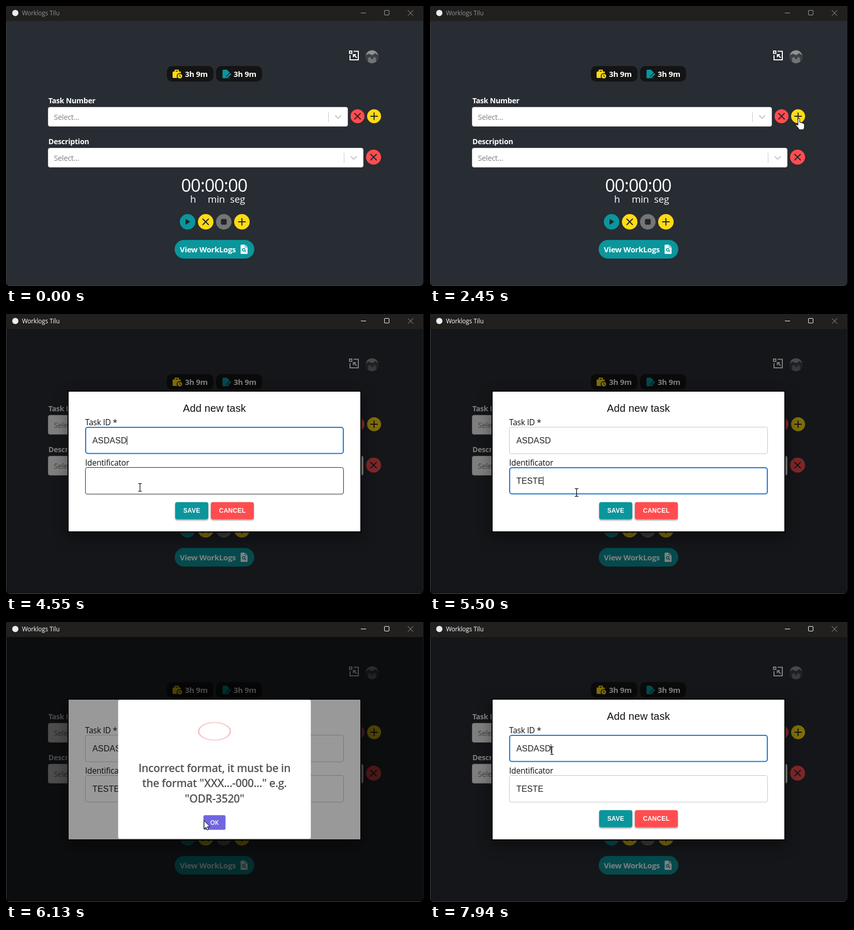
Recreate the animation shown at these times as an HTML page. Size 808 by 541 pixels, loop 8000 ms.

```html
<!DOCTYPE html>
<html lang="en">
<head>
<meta charset="utf-8">
<title>Worklogs</title>
<style>
  html, body { margin: 0; width: 100%; height: 100%; overflow: hidden; background: #000; }
  svg { display: block; width: 808px; height: 541px; }
  text { font-family: "Open Sans", "Noto Sans", sans-serif; white-space: pre; }
  .bold { font-weight: 700; fill: #fff; letter-spacing: -.02em; }
  .label { font-size: 14.2px; }
  .pill { font-size: 14.9px; }
  .hint { font-size: 14.5px; fill: #808080; letter-spacing: -.02em; }
  .unit { font-size: 18.8px; fill: #fff; letter-spacing: -.01em; }
  .field { font-size: 15.5px; fill: #111; letter-spacing: -.013em; }
  .arial { font-family: "Liberation Sans", Arial, sans-serif; }
  .input { font-size: 16px; fill: #212121; letter-spacing: .00938em; }
  .button { font-size: 12px; font-weight: 700; fill: #fff; letter-spacing: .02em; }
  .alert { font-size: 21.8px; font-weight: 600; fill: #545454; letter-spacing: -.019em; }
  .mid { text-anchor: middle; }
  .dark { stroke: #22252b; stroke-width: 2; fill: none; stroke-linecap: round; }
  .line { fill: none; stroke: #fff; stroke-width: 2; }
  .raised { filter: drop-shadow(0 2px 1.5px rgba(0,0,0,.4)); }
  .raised.over { filter: drop-shadow(0 4px 4px rgba(0,0,0,.5)); }
  #modal > .paper { filter: drop-shadow(0 10px 14px rgba(0,0,0,.4)); }
</style>
</head>
<body>
<svg viewBox="0 0 808 541">
  <defs>
    <path id="cross" class="dark" d="M-5.5-5.5 5.5 5.5M5.5-5.5-5.5 5.5"/>
    <path id="plus" class="dark" d="M-6.5 0H6.5M0-6.5V6.5"/>
    <path id="chevron" d="M-5-2.5 0 2.5 5-2.5" fill="none" stroke="#ccc" stroke-width="2.4" stroke-linecap="round"/>
    <clipPath id="face"><circle cx="707.5" cy="98" r="12.5"/></clipPath>
  </defs>

  <rect width="808" height="541"/>
  <rect x=".5" y="-10" width="805.5" height="550.5" rx="7" fill="#282c33" stroke="#3b3e43"/>
  <rect width="806" height="29" fill="#21201f"/>

  <circle cx="18" cy="13.5" r="6" fill="#e9eef2"/>
  <text id="caption" x="31" y="18" font-size="11.8" letter-spacing="-.1">Worklogs Tilu</text>
  <g id="controls" fill="none">
    <path d="M686 13.5H696"/>
    <rect x="731.5" y="8.5" width="9" height="9" rx="1.5"/>
  </g>
  <path d="M777 8.5 787 18.5M787 8.5 777 18.5" stroke="#a5a5a5"/>

  <!-- header -->
  <g class="line">
    <rect x="664" y="87" width="4.5" height="4.5"/>
    <path d="M672 87.5H681V104H665V95M678 100 671.5 93.5M671.5 99V94H676.5"/>
  </g>
  <g clip-path="url(#face)">
    <rect x="694" y="85" width="27" height="27" fill="#8f9296"/>
    <path d="M694 96 701 92 708 95 714 91 721 96V112H694Z" fill="#3f4042"/>
    <path d="M700 112V103Q700 98 704 99L708 104 712 98Q716 99 716 112Z" fill="#727376"/>
  </g>
  <rect x="311" y="116" width="90" height="30" rx="10" fill="#141414"/>
  <rect x="406" y="116" width="89" height="30" rx="10" fill="#141414"/>
  <g fill="#ffdb15">
    <rect x="322" y="126.500" width="16" height="12.500" rx="1.500"/>
    <path d="M327 127V124H333V127" fill="none" stroke="#ffdb15" stroke-width="2"/>
    <circle cx="336" cy="135.500" r="5.300" stroke="#141414" stroke-width="1.500"/>
    <path d="M336 132.500V136L338 137" fill="none" stroke="#141414" stroke-width="1.200"/>
  </g>
  <path d="M420 123H427L432 128V138Q432 139.500 430.500 139.500H420Q418.500 139.500 418.500 138V124.500Q418.500 123 420 123Z" fill="#0a969c"/>
  <path d="M435 130 427 138" stroke="#141414" stroke-width="5.500"/>
  <path d="M434.500 130.500 427 138" stroke="#0a969c" stroke-width="3"/>
  <text class="bold pill" x="346" y="137">3h 9m</text>
  <text class="bold pill" x="440" y="137">3h 9m</text>

  <!-- selects -->
  <text class="bold label" x="82" y="188">Task Number</text>
  <text class="bold label" x="82" y="267">Description</text>
  <g fill="#fff" stroke="#ccc">
    <rect x="81.500" y="195.500" width="579" height="37" rx="3.500"/>
    <rect x="81.500" y="274.500" width="609" height="37" rx="3.500"/>
    <path d="M623.500 204V224M653.500 283V303"/>
  </g>
  <text class="hint" x="92.500" y="220">Select...</text>
  <text class="hint" x="92.500" y="299">Select...</text>
  <use href="#chevron" x="642" y="214.500"/>
  <use href="#chevron" x="672" y="293.500"/>
  <circle cx="679.500" cy="213" r="13.500" fill="#ff4d4f"/>
  <circle cx="711.500" cy="213" r="13.500" fill="#ffdb15"/>
  <circle cx="710.500" cy="292" r="14.500" fill="#ff4d4f"/>
  <use href="#cross" x="679.500" y="213"/>
  <use href="#plus" x="711.500" y="213"/>
  <use href="#cross" x="710.500" y="292"/>

  <!-- timer -->
  <text class="mid" x="402.500" y="359" font-size="34" fill="#fff" letter-spacing="-.85">00:00:00</text>
  <text class="unit" x="356" y="380">h</text>
  <text class="unit" x="390" y="380">min</text>
  <text class="unit" x="433" y="380">seg</text>
  <circle cx="351" cy="417" r="15" fill="#0a969c"/>
  <circle cx="386" cy="417" r="15" fill="#ffdb15"/>
  <circle cx="421" cy="417" r="15" fill="#757575"/>
  <circle cx="456" cy="417" r="15" fill="#ffdb15"/>
  <path d="M347.500 412 355.500 417 347.500 422Z" fill="#22252b" stroke="#22252b" stroke-linejoin="round"/>
  <use href="#cross" x="386" y="417"/>
  <rect x="415.500" y="411.500" width="11" height="11" rx="2" fill="#22252b"/>
  <use href="#plus" x="456" y="417"/>

  <rect x="326" y="452" width="154" height="36" rx="18" fill="#0a969c"/>
  <text class="bold pill" x="336" y="476">View WorkLogs</text>
  <path d="M455 461H462L467 466V477.500Q467 479 465.500 479H455Q453.500 479 453.500 477.500V462.500Q453.500 461 455 461Z" fill="#fff"/>
  <path d="M462 461V466H467" fill="none" stroke="#0a969c"/>
  <g fill="none" stroke="#0a969c" stroke-width="1.500"><circle cx="459.500" cy="471" r="2.500"/><path d="M461.500 473 464 475.500"/></g>

  <!-- form -->
  <g id="modal">
    <rect x="1" y="29" width="805" height="511" fill-opacity=".5"/>
    <rect class="paper" x="120" y="149" width="566" height="272" fill="#fff" stroke="#000" stroke-width="2"/>
    <text class="arial mid" x="403" y="189" font-size="20" letter-spacing=".15" fill="#111">Add new task</text>
    <text class="field" x="153" y="215">Task ID *</text>
    <text class="field" x="153" y="293">Identificator</text>
    <rect id="box0" fill="none" rx="4"/>
    <rect id="box1" fill="none" rx="4"/>
    <text id="text0" class="arial input" x="167" y="250"></text>
    <text id="text1" class="arial input" x="167" y="328"></text>
    <rect id="caret" width="1" height="17" fill="#000"/>
    <rect id="save" class="raised" x="327" y="363.500" width="64" height="33" rx="4" fill="#0a969c"/>
    <rect class="raised" x="396" y="363.500" width="83" height="33" rx="4" fill="#ff4d4f"/>
    <text class="arial button mid" x="359" y="384">SAVE</text>
    <text class="arial button mid" x="437.500" y="384">CANCEL</text>
  </g>

  <!-- alert -->
  <rect id="shade" x="1" y="29" width="805" height="511"/>
  <g id="alert">
    <rect x="211" y="146" width="384" height="277" rx="4" fill="#fff"/>
    <g fill="none" stroke="#f27474">
      <circle id="ring" r="31.500" stroke-width="3"/>
      <path id="mark" d="M-11.500-11.500 11.500 11.500M11.500-11.500-11.500 11.500" stroke-width="4"/>
    </g>
    <text class="alert mid" x="403" y="290.500">Incorrect format, it must be in</text>
    <text class="alert mid" x="403" y="320.500">the format "XXX...-000..." e.g.</text>
    <text class="alert mid" x="403" y="350.500">"ODR-3520"</text>
    <rect id="ok" x="381" y="376" width="44" height="29" rx="3"/>
    <text class="mid" x="403" y="395" font-size="12" font-weight="600" fill="#fff">OK</text>
  </g>

  <g id="cursor">
    <path id="arrow" d="M0 0V16L3.700 12.600 6.200 18.400 8.700 17.300 6.200 11.700H11.300Z" fill="#fff" stroke="#000"/>
    <path id="hand" d="M-1.700 12V1.700a1.700 1.700 0 0 1 3.400 0V8q3-1 3.400 1 2.700-.8 3.200 1 2.500-.3 2.500 2v4q0 3-2 6h-8q-2-4-6.500-8.500 1-2.500 4-.5z" fill="#fff" stroke="#000"/>
    <path id="beam" d="M-3.500-7.500H-1Q0-7.500 0-6.500 0-7.500 1-7.500H3.500M0-6.500V6.500M-3.500 7.500H-1Q0 7.500 0 6.500 0 7.500 1 7.500H3.500" fill="none" stroke="#000" stroke-width="1.200"/>
  </g>
</svg>
<script>
const LOOP = 8000, ACTIVE = 2710, OPEN = 2770, ALERT = 5911, CLOSE = 7190;
const $ = id => document.getElementById(id);
const set = (id, attrs) => { for (const k in attrs) $(id).setAttribute(k, attrs[k]); };
const show = (id, on) => set(id, { visibility: on ? 'visible' : 'hidden' });
const clamp = v => Math.max(0, Math.min(1, v));
const inside = (x, y, l, t, r, b) => x >= l && x <= r && y >= t && y <= b;

// Linear interpolation through rows of [time, value, ...].
function track(rows, t) {
  const i = rows.findIndex(r => r[0] > t);
  if (i < 0) return rows[rows.length - 1].slice(1);
  if (!i) return rows[0].slice(1);
  const a = rows[i - 1], b = rows[i], k = (t - a[0]) / (b[0] - a[0]);
  return a.slice(1).map((v, j) => v + (b[j + 1] - v) * k);
}

const path = [
  [140, 740, 494], [500, 762, 400], [880, 774, 294], [1200, 768, 166],
  [1420, 765, 180], [1750, 750, 200], [2100, 724, 234], [2450, 713, 217],
  [3120, 713, 217], [3800, 320, 250], [4330, 320, 250], [4550, 259, 335],
  [5430, 259, 335], [5780, 381, 384], [6060, 381, 384], [6840, 403, 381],
  [7200, 403, 381], [7690, 226, 245], [7930, 226, 245], [7940, 235.5, 248.5]
];
const pop = [[0, .7], [135, 1.05], [240, .95], [300, 1]];
const markPop = [[250, 20, .4, 0], [400, -4.5, 1.15, .6], [500, 0, 1, 1]];
const fields = [
  { y: 218, word: 'ASDASD', keys: [4060, 4120, 4180, 4240, 4300, 4360], focus: [[4000, 4750], [7800, LOOP]] },
  { y: 296, word: 'TESTE', keys: [4950, 5020, 5220, 5290, 5360], focus: [[4750, 5850]] }
];

function drawField(f, i, t, x, y, free) {
  const typed = f.keys.filter(k => k <= t);
  const span = f.focus.find(s => t >= s[0] && t < s[1]);
  const over = free && inside(x, y, 153, f.y, 653, f.y + 52);
  const inset = span ? 1 : .5;
  $('text' + i).textContent = f.word.slice(0, typed.length);
  set('box' + i, {
    x: 153 + inset, y: f.y + inset, width: 500 - 2 * inset, height: 52.5 - 2 * inset,
    stroke: span ? '#1976d2' : over ? '#212121' : '#c4c4c4', 'stroke-width': span ? 2 : 1
  });
  if (span) {
    const since = Math.max(span[0], ...typed);
    set('caret', { x: Math.round(167 + $('text' + i).getComputedTextLength()) - .5, y: f.y + 18 });
    show('caret', (t - since) % 1000 < 500);
  }
  return over;
}

function drawAlert(t) {
  const age = t - ALERT, gone = clamp((t - CLOSE) / 150);
  const on = age >= 0 && gone < 1;
  show('alert', on);
  set('shade', { 'fill-opacity': .4 * Math.min(clamp((age + 14) / 100), 1 - gone) });
  if (!on) return false;
  const s = gone ? 1 - gone / 2 : track(pop, age)[0];
  set('alert', { transform: `translate(403 284.5) scale(${s}) translate(-403 -284.5)`, opacity: 1 - gone });
  const turn = clamp(age / 500);
  const tilt = Math.max(0, Math.cos((1 - turn) * 100 * Math.PI / 180));
  const [dy, zoom, alpha] = track(markPop, age);
  set('ring', { transform: `translate(403 209) scale(1 ${tilt})`, opacity: turn });
  set('mark', { transform: `translate(403 ${208.5 + dy}) scale(${zoom})`, opacity: alpha });
  return true;
}

function draw(t) {
  const [x, y] = track(path, t);
  const active = t >= ACTIVE, open = t >= OPEN;
  set('caption', { fill: active ? '#fff' : '#929292' });
  set('controls', { stroke: active ? '#fff' : '#a0a0a0' });
  set('modal', { opacity: clamp((t - OPEN) / 225) });

  const alertOn = drawAlert(t), free = open && !alertOn;
  show('caret', false);
  const typing = fields.map((f, i) => drawField(f, i, t, x, y, free)).includes(true);
  const onSave = open && inside(x, y, 327, 363, 391, 397);
  $('save').classList.toggle('over', onSave && t < ALERT + 300);
  const onOk = alertOn && inside(x, y, 383, 376, 423, 405) && t > 6300;
  set('ok', { fill: onOk ? '#655cca' : '#7066e0' });

  const onPlus = !open && Math.hypot(x - 711.5, y - 213) < 13.5;
  const hand = onOk || onPlus || (free && onSave);
  set('cursor', { transform: `translate(${x} ${y})`, opacity: t < 140 ? 0 : 1 });
  show('beam', typing);
  show('hand', hand);
  show('arrow', !typing && !hand);
}

let start;
function frame(now) {
  start ??= now;
  draw((now - start) % LOOP);
  requestAnimationFrame(frame);
}
draw(0);
requestAnimationFrame(frame);
</script>
</body>
</html>
```
